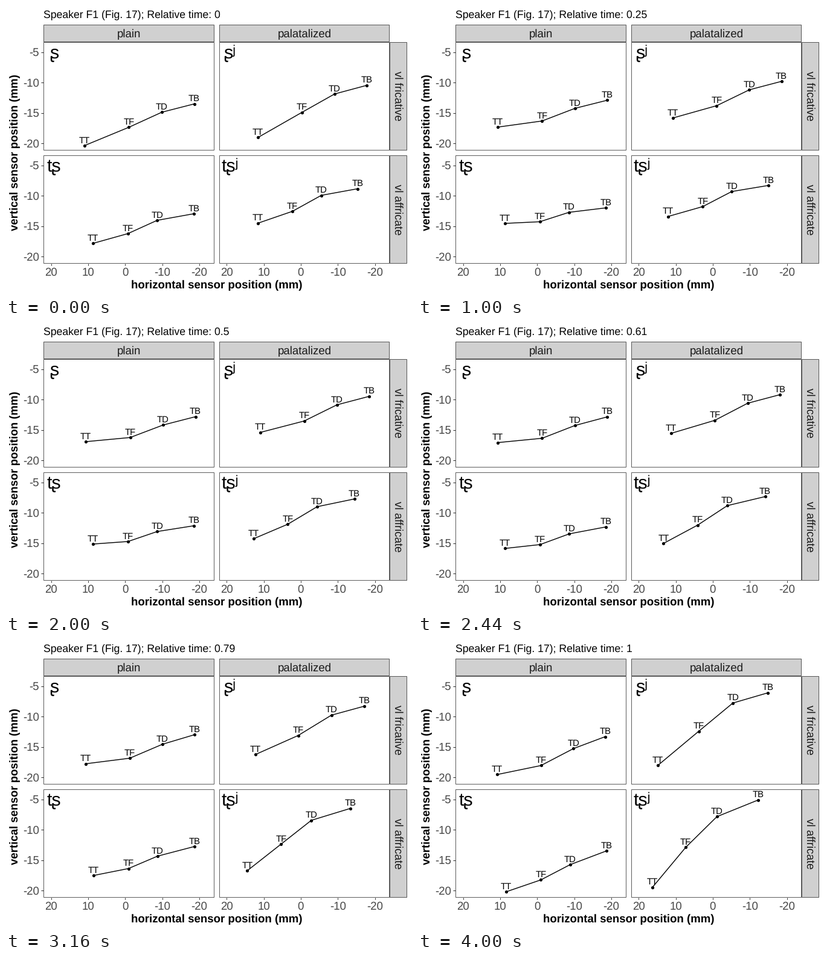
These frames come from a looping animation (672x480 px, 4040 ms). A matplotlib script:

```python
import numpy as np
import matplotlib.pyplot as plt
from matplotlib.animation import FuncAnimation
from matplotlib.patches import Rectangle

W, H, DPI = 672, 480, 96
FRAMES, INTERVAL = 101, 40
PX = 72 / DPI
INK, EDGE, TICK, STRIP = "#1a1a1a", "#333333", "#474747", "#d0d0d0"

plt.rcParams.update({
    "font.family": ["Liberation Sans", "DejaVu Sans"],
    "text.hinting": "none",
    "axes.unicode_minus": False,
})

fig = plt.figure(figsize=(W / DPI, H / DPI), dpi=DPI, facecolor="white")
ax = fig.add_axes([0, 0, 1, 1])
ax.set_xlim(0, W)
ax.set_ylim(H, 0)
ax.axis("off")


def text(x, y, s, size=14, color="black", ha="center", rot=0, **kw):
    return ax.text(x, y, s, fontsize=size, color=color, ha=ha, va="baseline",
                   rotation=rot, rotation_mode="anchor", **kw)


def box(x, y, w, h, fill):
    # The outline lies just inside the box
    ax.add_patch(Rectangle((x, y), w - 1, h - 1, fc=fill, ec=EDGE,
                           lw=0.8 * PX))


def tick(xs, ys):
    ax.plot(xs, ys, color=EDGE, lw=1.07 * PX, solid_capstyle="butt")


# Facet layout
COLS, ROWS = (62, 352.6), (60, 248)
PW, PH, SH = 282.8, 179.6, 29
X_MM, Y_MM = 6.137, 10.1

for left, name in zip(COLS, ("plain", "palatalized")):
    box(left, ROWS[0] - SH, PW, SH, STRIP)
    text(left + PW / 2, 52.5, name, color=INK)
    for mm in range(20, -21, -10):
        x = left + 135.3 - mm * X_MM
        tick([x, x], [ROWS[1] + PH, ROWS[1] + PH + 3.7])
        text(x, 447.4, str(mm), color=TICK)

for top, name in zip(ROWS, ("vl fricative", "vl affricate")):
    box(COLS[1] + PW, top, SH, PH, STRIP)
    text(643.3, top + PH / 2, name, color=INK, rot=270)
    for mm in range(-5, -21, -5):
        y = top + 16.7 - (mm + 5) * Y_MM
        tick([COLS[0] - 3.7, COLS[0]], [y, y])
        text(54.9, y + 6.3, str(mm), color=TICK, ha="right")
    for left in COLS:
        box(left, top, PW, PH, "white")

text(348.8, 469, "horizontal sensor position (mm)", weight="bold")
text(20.5, 243.2, "vertical sensor position (mm)", weight="bold", rot=90)
title = text(62, 19, "", 13.2, ha="left")

SENSORS = ("TT", "TF", "TD", "TB")


class Manner:
    """Timing and sensor spacing shared by one row."""

    def __init__(self, gaps, fade, tau, power):
        self.gaps, self.fade = np.array(gaps), np.array(fade)
        self.tau, self.power = tau, power

    def phases(self, t):
        """A quick closing gesture and a late release, both from 0 to 1."""
        return 1 - np.exp(-t / self.tau), t ** self.power


MANNERS = (Manner((0, 0.405, 0.705, 1), (1, 0.34, 0.21, 0.2), 0.15, 4),
           Manner((0, 0.347, 0.636, 1), (1, 0.6, 0.41, 0.29), 0.12, 2.3))


class Tongue:
    """tip, back: (start x, late shift); lift fades from the tip backwards."""

    def __init__(self, col, row, symbol, tip, back, slide, rest, lift, drop):
        text(COLS[col] + 17.8, ROWS[row] + 27.2, symbol, 22.76)
        self.manner, self.bunch = MANNERS[row], 0.09 * col
        self.tip, self.back, self.slide = tip, back, slide
        self.rest, self.drop = np.array(rest), np.array(drop)
        self.lift = lift
        self.line, = ax.plot([], [], "o-", color="black", lw=1.42 * PX,
                             ms=5.2 * PX, mew=0)
        self.tags = [text(0, 0, s, 11.2) for s in SENSORS]

    def move(self, t):
        m = self.manner
        close, late = m.phases(t)
        tip, back = (x + dx * late + self.slide * close
                     for x, dx in (self.tip, self.back))
        x = tip + (back - tip) * m.gaps ** (1 + self.bunch * late)
        y = self.rest - self.lift * m.fade * close + self.drop * late
        self.line.set_data(x, y)
        for tag, a, b in zip(self.tags, x, y):
            tag.set_position((a, b - 4.4))


tongues = (
    Tongue(0, 0, "ʂ", (129.8, -1), (311.6, -4), 2.3,
           (231.9, 201.4, 176.4, 162.6), 38, (29.5, 20, 12, 5.5)),
    Tongue(1, 0, "ʂʲ", (417, -26), (597, -24), 5.8,
           (218.4, 176.6, 146.1, 131.8), 40, (30, -11.5, -33, -36)),
    Tongue(0, 1, "tʂ", (143.8, 2), (311, 1.7), -0.3,
           (394.3, 378, 356, 345), 41, (65, 45, 34, 17)),
    Tongue(1, 1, "tʂʲ", (416.8, -27), (582, -17.5), -1.8,
           (360.8, 341, 314.5, 303.5), 16, (66, 13, -14.5, -33)),
)


def update(i):
    t = i / (FRAMES - 1)
    title.set_text(f"Speaker F1 (Fig. 17); Relative time: {t:g}")
    for tongue in tongues:
        tongue.move(t)


anim = FuncAnimation(fig, update, frames=FRAMES, interval=INTERVAL,
                     repeat=True, repeat_delay=0)
plt.show()
```
